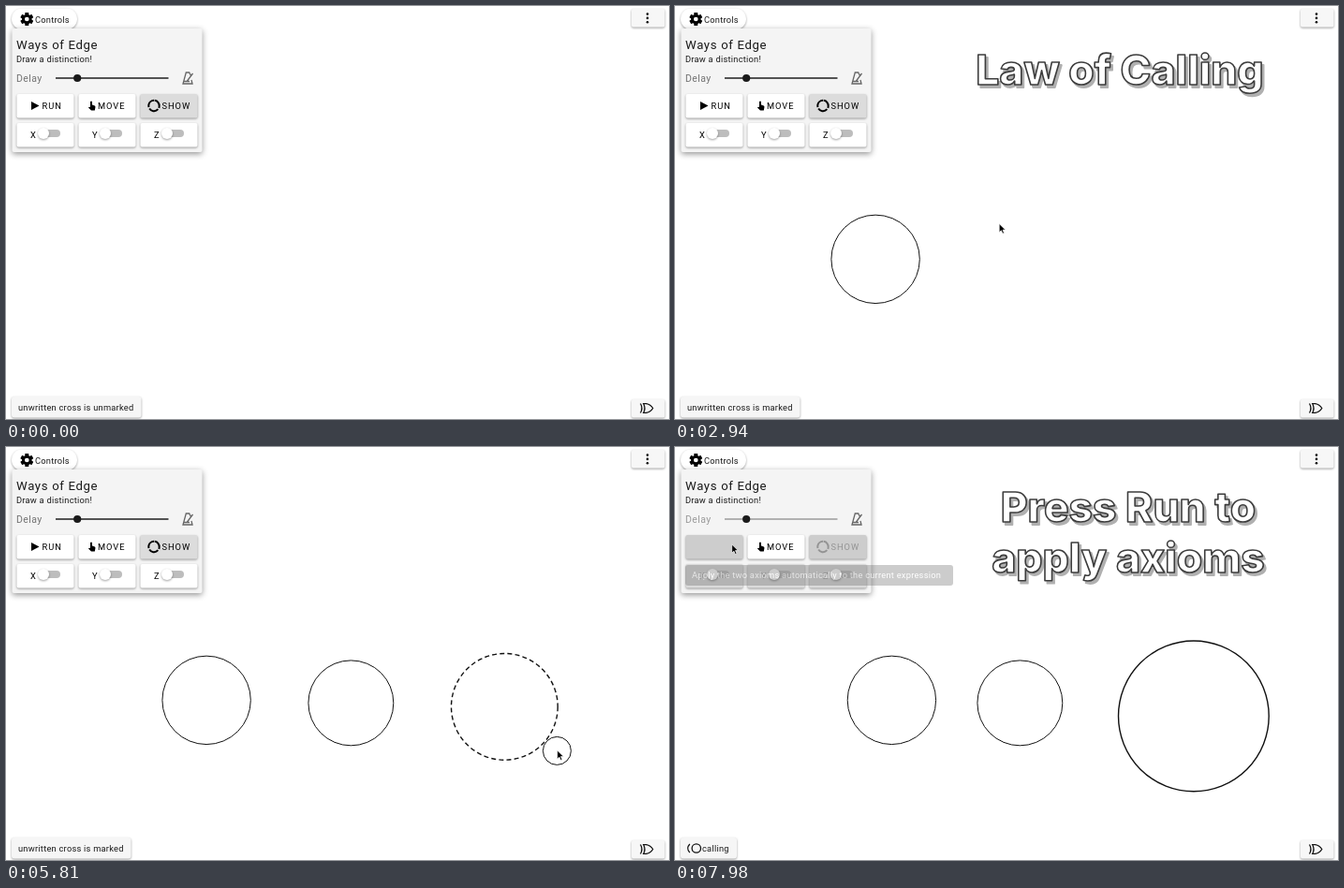
Write an HTML page that moves like this. It is 708 px wide and 441 px high and loops after 8 s.

```html
<!DOCTYPE html>
<html lang="en">
<head>
<meta charset="utf-8">
<title>Controls</title>
<style>
  html, body { margin: 0; width: 100%; height: 100%; overflow: hidden; background: #fff; }
  svg { display: block; width: 708px; height: 441px; }
  text { font: 9.3px Roboto, sans-serif; letter-spacing: .24px; fill: #1a1a1a; white-space: pre; }
  .name { font-size: 13.2px; letter-spacing: .65px; }
  .delay { font-size: 10.5px; letter-spacing: .4px; }
  .btn text { letter-spacing: .95px; fill: #000; }
  .raised { filter: drop-shadow(0 1px 1.2px rgba(0,0,0,.38)); }
  .panel { filter: drop-shadow(0 2px 3px rgba(0,0,0,.42)); }
  .caption text { font: 800 44.3px Inter, sans-serif; letter-spacing: 0; text-anchor: middle; stroke-linejoin: round; }
  .caption .shade { fill: #b0b0b0; stroke: #b0b0b0; stroke-width: 1.8; }
  .caption .face { fill: #fff; stroke: #3c3c3c; stroke-width: 1.6; }
  .line { fill: none; stroke: #111; }
</style>
</head>
<body>
<svg viewBox="0 0 708 441">
  <rect class="raised" x="6" y="2.5" width="70" height="22.500" rx="11.250" fill="#fff"/>
  <rect class="panel" x="6.5" y="24" width="203" height="132" rx="2" fill="#f4f4f4"/>
  <g id="gear" transform="translate(22.3 14)"></g>
  <text x="31" y="17.5">Controls</text>
  <text class="name" x="11" y="45.5">Ways of Edge</text>
  <text x="11" y="59.6">Draw a distinction!</text>
  <text class="delay" id="delay" x="11" y="80.7">Delay</text>
  <path id="track" d="M53 77H173.5" stroke-width="1.5"/>
  <circle cx="76.2" cy="77" r="4.1" fill="#1a1a1a"/>
  <path d="M197.5 74.5L195.700 71H192.300L189 83H199L198 79M190 80.500H196M193.500 80L199.500 72" fill="none" stroke="#666" stroke-width="1.3"/>
  <g id="buttons"></g>

  <g class="raised">
    <rect x="668" y="3" width="35.5" height="19.5" rx="2" fill="#f7f7f7"/>
    <rect x="668" y="420" width="35.5" height="19.5" rx="2" fill="#f7f7f7"/>
    <rect id="chip" x="6" y="417" width="138" height="22.5" rx="3" fill="#f6f6f6"/>
  </g>
  <g fill="#111"><circle cx="685" cy="8.6" r="1.3"/><circle cx="685" cy="12.9" r="1.3"/><circle cx="685" cy="17.2" r="1.3"/></g>
  <path class="line" stroke-width="1.3" d="M677.500 424.500Q680.500 429.500 677.500 434.500M680.800 424.700H683.800Q688.300 425.500 690.800 429.500Q688.300 433.500 683.800 434.300H680.800Q683.300 429.500 680.800 424.700Z"/>
  <text id="status" x="13" y="432"></text>
  <g id="calling">
    <path class="line" stroke-width="1.3" d="M15.800 424Q11.500 428.500 15.800 433"/>
    <circle class="line" cx="22.800" cy="428.500" r="4.700" stroke-width="1.300"/>
    <text x="29" y="432">calling</text>
  </g>

  <g id="captions"></g>
  <g id="circles" transform="translate(.35 .35)"></g>
  <g id="tip">
    <rect x="11" y="126" width="286" height="22" rx="3" fill="#616161" fill-opacity=".9"/>
    <text x="18" y="140" style="fill:#fff">Apply the two axioms automatically to the current expression</text>
  </g>
  <circle id="press" class="line" cx=".4" cy=".4" r="15"/>
  <path id="arrow" d="M0 0V9.200L2.200 7.200L3.700 10.600L5.300 9.900L3.800 6.600H6.700Z" fill="#000" stroke="#fff" stroke-width=".7"/>
  <g id="hand">
    <path d="M0 .8Q1.200-.6 2.200.8V4.400Q5 4 7.200 5.600Q8 8 6.600 11.300H1.800L-2 6.600Q-1.600 5 0 6.500Z" fill="#fff" stroke="#111" stroke-width=".9"/>
    <path class="line" stroke-width=".6" d="M3.400 7V9.500M5 7V9.500"/>
  </g>
</svg>
<script>
const LOOP = 8000, LAG = 70;
const $ = id => document.getElementById(id);
const ramp = (t, a, b) => Math.min(1, Math.max(0, (t - a) / (b - a)));
const show = (el, on) => el.style.display = on ? '' : 'none';

// time, x, y, eased arrival
const PATH = [
  [1470, 180, 240], [1850, 180, 240], [2450, 247.5, 303, 1], [2590, 247.5, 303],
  [2940, 345.5, 232.5, 1], [3640, 345.5, 233.5], [4060, 390.5, 312.5, 1], [4300, 390.5, 312.5],
  [4900, 485, 245, 1], [5200, 485, 245], [5740, 579, 309], [5810, 588, 324],
  [6160, 622, 329, 1], [6370, 622, 329], [7200, 62, 124, 1], [7350, 59, 117.5], [7600, 60, 104, 1]
];
const DRAWN = [
  { down: 1680, from: 1850, up: 2520, x: 180, y: 237, width: 1 },
  { down: 3570, from: 3640, up: 4200, x: 345.5, y: 233.5, width: 1 },
  { down: 5110, from: 5200, up: 6280, x: 485, y: 245, width: 1.4 }
];
const CAPTIONS = [
  { from: 560, to: 5530, lines: [['Law of Calling', 475, 84.3]] },
  { from: 6440, to: 9000, lines: [['Press Run to', 484, 80], ['apply axioms', 484, 134]] }
];

function pointer(t) {
  if (t <= PATH[0][0]) return PATH[0].slice(1, 3);
  const i = PATH.findIndex(p => p[0] > t);
  if (i < 0) return PATH[PATH.length - 1].slice(1, 3);
  const a = PATH[i - 1], b = PATH[i];
  let k = ramp(t, a[0], b[0]);
  if (b[3]) k = k * k * (3 - 2 * k);
  return [a[1] + (b[1] - a[1]) * k, a[2] + (b[2] - a[2]) * k];
}

const teeth = Array.from({ length: 6 }, (_, i) =>
  `<rect x="-2" y="-7" width="4" height="4" rx=".6" transform="rotate(${i * 60})"/>`).join('');
$('gear').innerHTML = teeth + '<circle r="3.8" fill="none" stroke="#000" stroke-width="2.9"/>';

const ICONS = [
  '<path d="M27 102L35.5 106.5L27 111Z"/>',
  '<path d="M90 107V102.2Q91 100.800 92 102.2V105.5L94.800 106.400Q95.700 107 95.400 108.300L94.800 111.500H91L88 108.400Q88.600 107.300 90 108Z"/>',
  '<circle cx="158" cy="106.5" r="5.7" fill="none" stroke="#000" stroke-width="2" stroke-dasharray="10.34 1.6" transform="rotate(-82 158 106.5)"/>'
];
const LEFT = [11.5, 77.5, 143.5];
const box = (x, y, fill) => `<rect class="raised" x="${x}" y="${y}" width="61" height="25.5" rx="2" fill="${fill}"/>`;
$('buttons').innerHTML = ['RUN', 'MOVE', 'SHOW'].map((word, i) =>
  `<g class="btn">${box(LEFT[i], 94, i === 2 ? '#dcdcdc' : '#fff')}<g class="face">${ICONS[i]}<text x="${[38.5, 98, 166.5][i]}" y="110">${word}</text></g></g>`
).join('') + ['X', 'Y', 'Z'].map((word, i) => {
  const x = LEFT[i];
  return `<g class="btn">${box(x, 125, '#fff')}<text x="${x + 14.5}" y="140.5">${word}</text>
    <rect x="${x + 26}" y="132" width="20.5" height="8" rx="4" fill="#bdbdbd"/>
    <circle class="raised" cx="${x + 28.5}" cy="136" r="6" fill="#fff"/></g>`;
}).join('');
const buttons = [...$('buttons').children];
const backs = buttons.map(b => b.querySelector('rect'));
const faces = buttons.map(b => b.querySelector('.face'));

$('captions').innerHTML = CAPTIONS.map(c => '<g class="caption">' + c.lines.map(([s, x, y]) =>
  `<text class="shade" x="${x + 2.5}" y="${y + 2.5}">${s}</text><text class="face" x="${x}" y="${y}">${s}</text>`
).join('') + '</g>').join('');
$('circles').innerHTML = DRAWN.map(d => `<circle class="line" stroke-width="${d.width}"/>`).join('');

const grey = v => `rgb(${v},${v},${v})`;
const mix = (a, b, k) => grey(Math.round(a + (b - a) * k));

function render(t) {
  const [x, y] = pointer(t);
  DRAWN.forEach((d, i) => {
    const c = $('circles').children[i];
    const [ex, ey] = pointer(Math.min(t, d.up) - LAG);
    const dx = ex - d.x, dy = ey - d.y;
    const slide = i === 0 ? 17.3 * ramp(t, 7770, 7980) ** 2 : 0;
    show(c, t > d.from + LAG);
    c.setAttribute('cx', d.x + dx / 2 + slide);
    c.setAttribute('cy', d.y + dy / 2);
    c.setAttribute('r', Math.hypot(dx, dy) / 2);
    c.setAttribute('stroke-dasharray', t < d.up ? '5 3.2' : 'none');
  });
  CAPTIONS.forEach((c, i) => {
    $('captions').children[i].style.opacity = ramp(t, c.from, c.from + 280) * (1 - ramp(t, c.to, c.to + 240));
  });

  const off = ramp(t, 7780, 7960);
  const overX = t > 7230 && t < 7400, overRun = t >= 7400;
  backs[0].setAttribute('fill', mix(overRun ? 245 : 255, 205, off));
  backs[2].setAttribute('fill', mix(220, 205, off));
  for (let i = 3; i < 6; i++)
    backs[i].setAttribute('fill', mix(i === 3 && overX ? 243 : 255, 218, off));
  faces[0].style.opacity = 1 - off;
  faces[2].style.opacity = 1 - .72 * off;
  $('delay').style.fill = mix(115, 155, off);
  $('track').setAttribute('stroke', mix(30, 155, off));
  for (let i = 3; i < 6; i++)
    buttons[i].querySelector('text').style.opacity = 1 - .74 * off;

  const calling = t >= 7840, marked = t >= 2520;
  show($('status'), !calling);
  show($('calling'), calling);
  $('status').textContent = 'unwritten cross is ' + (marked ? 'marked' : 'unmarked');
  $('chip').setAttribute('width', calling ? 60 : marked ? 127.5 : 138.5);
  $('tip').style.opacity = ramp(t, 7490, 7640) * (1 - ramp(t, 7890, 8030));

  const hand = t >= 7230 && t < 7840;
  show($('hand'), hand);
  show($('arrow'), t >= PATH[0][0] && !hand);
  show($('press'), DRAWN.some(d => t >= d.down && t < d.up));
  for (const id of ['hand', 'arrow', 'press'])
    $(id).setAttribute('transform', `translate(${x + (id === 'arrow' ? .7 : 0)} ${y})`);
}

let start;
function tick(now) {
  start ??= now;
  render((now - start) % LOOP);
  requestAnimationFrame(tick);
}
render(0);
requestAnimationFrame(tick);
</script>
</body>
</html>
```
